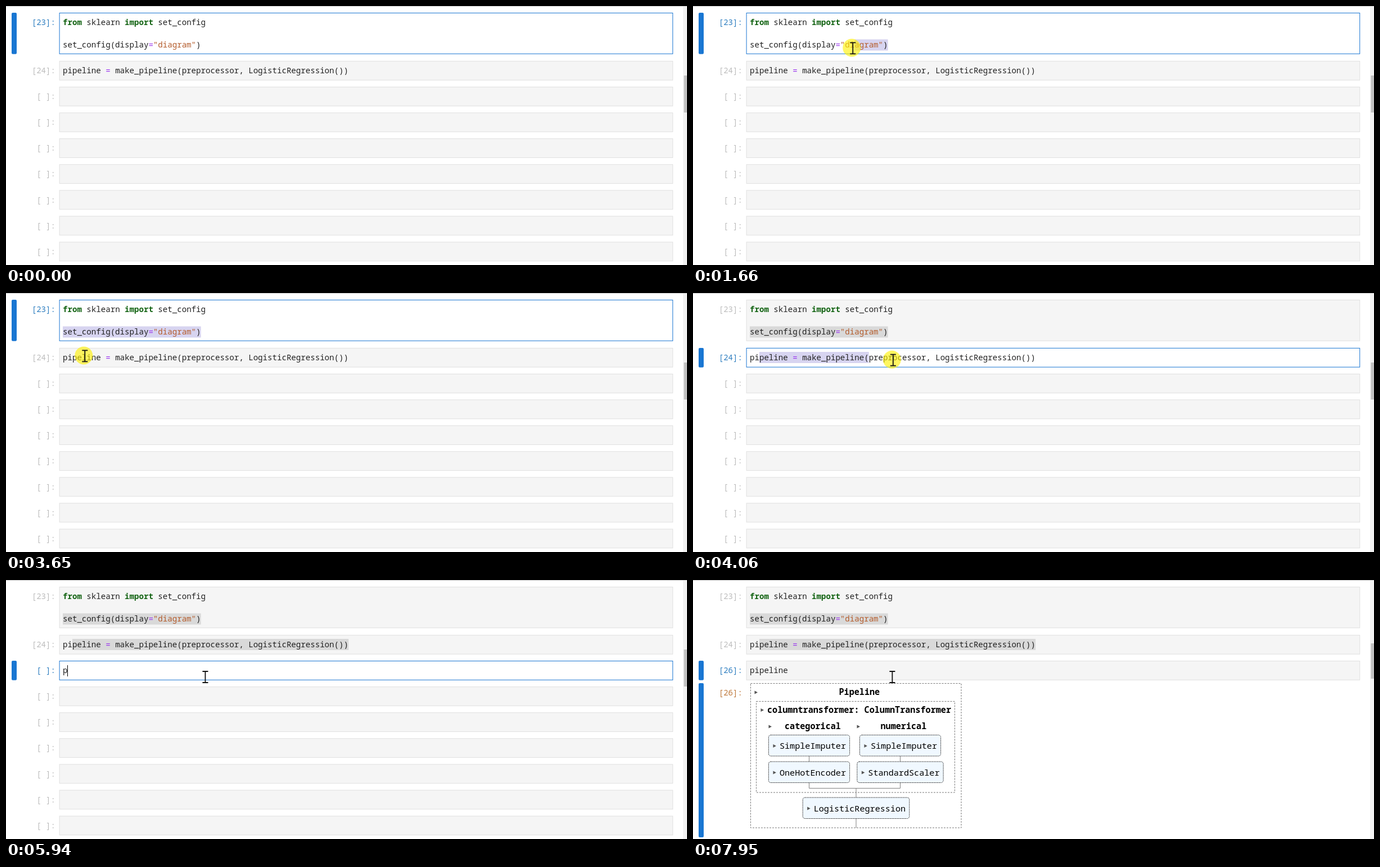
Write an HTML page that moves like this. It is 1211 px wide and 462 px high and loops after 8000 ms.

```html
<!DOCTYPE html>
<html lang="en">
<head>
<meta charset="utf-8">
<title>Notebook pipeline diagram</title>
<style>
html, body { margin: 0; width: 100%; height: 100%; overflow: hidden; background: #fff; }
svg { display: block; width: 100vw; height: 100vh; }
text { font: 14.12px "Noto Sans Mono", "DejaVu Sans Mono", monospace; fill: #212121; white-space: pre; }
.prompt { text-anchor: end; }
.kw { fill: #146414; font-weight: 700; }
.op { fill: #9a35ee; }
.str { fill: #b45c2c; }
.diagram text { font-size: 15.15px; fill: #000; }
.diagram .title { font-weight: 700; }
.diagram .prompt { font-size: 14.12px; fill: #bf7a3d; }
.dash { fill: none; stroke: #777; stroke-dasharray: 3 2; }
.step { fill: #f0f8ff; stroke: #333; stroke-dasharray: 2 1; }
.link { fill: none; stroke: #808080; }
.arrow { fill: #555; }
</style>
</head>
<body>
<svg id="stage" viewBox="0 0 1211 462" preserveAspectRatio="none"></svg>
<script>
const LOOP = 8000, LEFT = 101, CHAR = 8.47, PITCH = 46.1, BIG_CHAR = 9.09;
const BLUE = "#1976d2", PROMPT = "#307fc1", IDLE = "#bdbdbd";
const stage = document.getElementById("stage");

const clamp = (v, low, high) => Math.max(low, Math.min(high, v));

function set(el, attrs) {
  for (const key in attrs) el.setAttribute(key, attrs[key]);
}
function add(tag, attrs, parent = stage) {
  const el = document.createElementNS("http://www.w3.org/2000/svg", tag);
  set(el, attrs);
  parent.appendChild(el);
  return el;
}
function show(el, on) {
  el.setAttribute("visibility", on ? "visible" : "hidden");
}
function rect(x, y, width, height, attrs, parent) {
  return add("rect", { x, y, width, height, ...attrs }, parent);
}
// Each run is a plain string or [class, string].
function write(x, y, runs, attrs, parent) {
  const el = add("text", { x, y, ...attrs }, parent);
  for (const run of runs) {
    const [name, str] = Array.isArray(run) ? run : ["", run];
    add("tspan", { class: name }, el).textContent = str;
  }
  return el;
}

// Page frame and scroll bar
rect(0, 0, 1211, 462, { fill: "#fff" });
rect(0, 0, 1211, 1, { fill: "#c4c4c4" });
rect(1204, 1, 7, 461, { fill: "#f1f1f1" });
const thumb = rect(1205.5, 124, 5.5, 66, { fill: "#c1c1c1" });

// Cells: one tall, then a regular column
const cells = Array.from({ length: 9 }, (_, i) => {
  const shift = PITCH * (i - 1);
  const y = i ? 98.4 + shift : 12.5;
  const height = i ? 33.8 : 72.8;
  const group = add("g", {});
  return {
    y, height, group,
    box: rect(95.1, y, 1090.6, height, {}, group),
    prompt: write(88, i ? 120 + shift : 34, [], { class: "prompt" }, group)
  };
});
const marks = [59.5, 105].map(y => rect(0, y, 0, 20, {}));
write(LEFT, 34, [["kw", "from"], " sklearn ", ["kw", "import"], " set_config"]);
write(LEFT, 74, ["set_config(display", ["op", "="], ["str", '"diagram"'], ")"]);
write(LEFT, 120, ["pipeline ", ["op", "="], " make_pipeline(preprocessor, LogisticRegression())"]);
const typed = write(LEFT, 166, []);
const caret = rect(LEFT, 152, 1, 20, { fill: "#000" });
const bar = rect(10, 0, 9, 0, { rx: 2, fill: BLUE });

// Output diagram: two columns that join in the middle
const diagram = add("g", { class: "diagram" });
const COL_A = 206.5, COL_B = 368.5, MIDDLE = 290;

function arrow(x, y) {
  add("path", { class: "arrow", d: `M${x - 2.5} ${y - 3}l5.5 3l-5.5 3z` }, diagram);
}
function title(arrowX, x, y, label) {
  arrow(arrowX, y - 4.5);
  write(x, y, [label], { class: "title" }, diagram);
}
function step(center, y, label) {
  const width = label.length * BIG_CHAR + 26;
  const x = center - width / 2;
  rect(x, y, width, 37.5, { class: "step", rx: 4 }, diagram);
  arrow(x + 10.5, y + 19.5);
  write(x + 19.5, y + 24.5, [label], {}, diagram);
}
rect(10, 184, 9, 275, { rx: 2, fill: BLUE }, diagram);
write(88, 206, ["[26]:"], { class: "prompt" }, diagram);
rect(102.5, 184.5, 374.5, 257.5, { class: "dash" }, diagram);
rect(112.5, 216.5, 353, 162.5, { class: "dash" }, diagram);
add("path", {
  class: "link",
  d: `M${COL_A} 314V371.5H${COL_B}V314M${MIDDLE} 371.5V442`
}, diagram);
title(112, 259.5, 205, "Pipeline");
title(123, 132, 236.5, "columntransformer: ColumnTransformer");
title(137, 163, 266, "categorical");
title(294, 333.5, 266, "numerical");
step(COL_A, 276.5, "SimpleImputer");
step(COL_B, 276.5, "SimpleImputer");
step(COL_A, 324, "OneHotEncoder");
step(COL_B, 324, "StandardScaler");
step(MIDDLE, 388, "LogisticRegression");

// Pointer
const pointer = add("g", {});
const halo = add("circle", { cx: -2, cy: -1, r: 16, fill: "#fff000" }, pointer);
add("path", { d: "M-5-10H5M0-10V10M-5 10H5", fill: "none", stroke: "#111", "stroke-width": 1.8 }, pointer);

// The pointer moves in bursts of equal steps; ease and bend shape the x path.
const bursts = [
  { start: 260, end: 1040, count: 12, from: [902, 437], to: [350, 100], ease: .3 },
  { start: 1240, end: 2010, count: 12, from: [365, 76], to: [119, 75], ease: 1.83 },
  { start: 2080, end: 2690, count: 8, from: [112, 76], to: [102, 77] },
  { start: 3020, end: 3780, count: 10, from: [103, 79], to: [119, 122], bend: 38 },
  { start: 3850, end: 4340, count: 8, from: [120, 121], to: [651, 118], ease: .96 },
  { start: 4600, end: 4740, count: 3, from: [560, 140], to: [367, 172] },
  { start: 4940, end: 5150, count: 4, from: [354, 173], to: [354, 173] }
];

function pointAt(t, lag = 0) {
  const burst = bursts.filter(b => t >= b.start).pop() || bursts[0];
  const { start, end, count, from, to, ease = 1, bend = 0 } = burst;
  const last = count - 1;
  const k = clamp(Math.floor((t - start) / (end - start) * last + 1e-6), 0, last);
  const f = Math.max(0, k - lag) / last;
  return [
    from[0] + (to[0] - from[0]) * f ** ease + bend * Math.sin(Math.PI * f),
    from[1] + (to[1] - from[1]) * f
  ];
}
// The selection trails the pointer by half a step.
function charAt(t, last) {
  return clamp(Math.floor((pointAt(t, .5)[0] - LEFT) / CHAR), 0, last);
}
function mark(el, from, to, active) {
  set(el, {
    x: LEFT + from * CHAR,
    width: Math.max(0, to - from) * CHAR,
    fill: active ? "#d7d4f0" : "#d9d9d9"
  });
}

const keyTimes = [5940, 6140, 6340, 6670, 6870, 7020, 7150, 7220];

function draw(t) {
  const active = t < 3850 ? 0 : t < 5080 ? 1 : 2;
  const running = t >= 7750, done = t >= 7820;

  cells.forEach((cell, i) => {
    const current = i === active, editing = current && !running;
    set(cell.box, { fill: editing ? "#fff" : "#f5f5f5", stroke: editing ? BLUE : "#e0e0e0" });
    cell.prompt.style.fill = current ? PROMPT : IDLE;
    const count = i < 2 ? 23 + i : i > 2 || !running ? " " : done ? 26 : "*";
    cell.prompt.textContent = `[${count}]:`;
    show(cell.group, i < 3 || !done);
  });
  const { y, height } = cells[active];
  set(bar, { y: y - .5, height: height + 1 });

  // Each selection holds once its drag has ended.
  mark(marks[0], charAt(Math.min(t, 2690), 29), 29, active === 0);
  mark(marks[1], 2, charAt(clamp(t, 3850, 4340), 60), active === 1);

  const length = keyTimes.filter(k => t >= k).length;
  typed.textContent = "pipeline".slice(0, length);
  set(caret, { x: Math.round(LEFT + length * CHAR) });
  show(caret, active === 2 && !running && (t < 5610 || length > 0));

  const [px, py] = pointAt(t);
  set(pointer, { transform: `translate(${px + .4} ${py})` });
  show(pointer, t >= 260);
  set(halo, { opacity: t < 5150 ? .62 : 0 });

  show(diagram, done);
  set(thumb, t < 7950 ? { y: 124, height: 66 } : { y: 113, height: 63 });
}

const begin = performance.now();
function tick() {
  draw((performance.now() - begin) % LOOP);
  requestAnimationFrame(tick);
}
draw(0);
requestAnimationFrame(tick);
</script>
</body>
</html>
```
